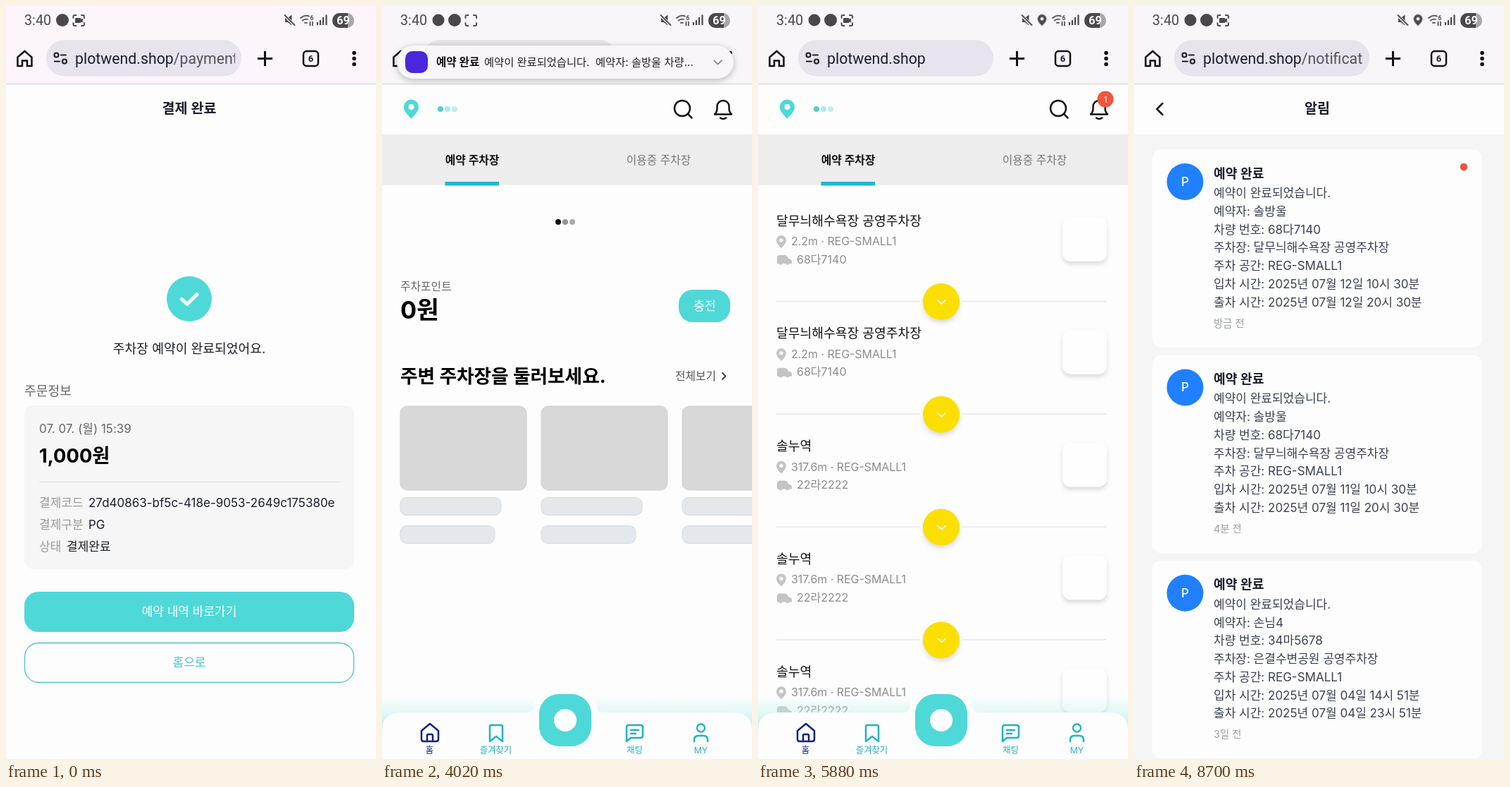
Recreate the animation shown at these times as an HTML page. Size 525 px wide and 1067 px high, loop 8.76 s.

```html
<!DOCTYPE html>
<html lang="ko">
<head>
<meta charset="utf-8">
<title>주차 예약</title>
<style>
html, body { margin: 0; width: 100%; height: 100%; overflow: hidden; background: #fdfdfd; }
svg { display: block; }
text { font-family: Inter, "Noto Sans CJK KR", sans-serif; font-size: 17px; fill: #1b1d2c; white-space: pre; }
.ui text { font-family: Roboto, sans-serif; }
.mid { text-anchor: middle; }
.line { fill: none; stroke: currentColor; stroke-width: 2.5; stroke-linecap: round; stroke-linejoin: round; }
.b { font-weight: 600; }
.bb { font-weight: 700; }
.grey { fill: #999; }
.s12 { font-size: 12.3px; }
.s14 { font-size: 14.4px; }
.s15 { font-size: 15.8px; }
.s18 { font-size: 18.2px; }
.s19 { font-size: 19.6px; }
.s21 { font-size: 21.3px; }
.s26 { font-size: 26.7px; }

/* scenes: hard cuts on one shared loop */
.cut { animation: 8.76s step-end infinite; }
.pay { animation-name: pay; }
.home { animation-name: home; }
.alerts { animation-name: alerts; }
.skeleton { animation-name: skeleton; }
.loaded { animation-name: loaded; }
.planet { animation-name: planet; }
.shift { animation-name: shift; }
.mute { animation-name: mute; }
.rec { animation-name: rec; }
@keyframes pay { 0% { opacity: 1 } 43.83%, 100% { opacity: 0 } }
@keyframes home { 0% { opacity: 0 } 43.83% { opacity: 1 } 69.17%, 100% { opacity: 0 } }
@keyframes alerts { 0% { opacity: 0 } 69.17%, 100% { opacity: 1 } }
@keyframes skeleton { 0% { opacity: 1 } 50%, 100% { opacity: 0 } }
@keyframes loaded { 0% { opacity: 0 } 50%, 100% { opacity: 1 } }
@keyframes planet { 0% { opacity: 0 } 15.74%, 100% { opacity: 1 } }
@keyframes shift { 0% { transform: none } 15.74%, 100% { transform: translateX(23px) } }
@keyframes mute { 0% { transform: none } 50%, 100% { transform: translateX(-21px) } }
@keyframes rec {
  0%, 8.21%, 19.17%, 29.44%, 41.09%, 51.36%, 62.32%, 73.28%, 83.55%, 94.51% { opacity: 1 }
  2.73%, 13.69%, 24.65%, 35.61%, 45.88%, 56.84%, 67.8%, 78.76%, 89.72% { opacity: 0 }
}

.bar { animation: bar 8.76s linear infinite; }
@keyframes bar { 0%, 19.17% { fill: #fcf5fc } 27.4%, 100% { fill: #f9f6fa } }

.toast { animation: toast 8.76s infinite; transform-origin: 260px 80px; filter: drop-shadow(0 2px 5px #0004); }
@keyframes toast {
  0%, 19.17% { transform: translateY(-115px) scale(.86); animation-timing-function: cubic-bezier(.2, .8, .2, 1) }
  27.4%, 54.1% { transform: none; animation-timing-function: cubic-bezier(.5, 0, .8, .5) }
  58.9%, 100% { transform: translateY(-115px) scale(.94) }
}

.dots circle { animation: .876s linear -.36s infinite; }
.dots circle:nth-child(1) { animation-name: dotA; }
.dots circle:nth-child(2) { animation-name: dotB; }
.dots circle:nth-child(3) { animation-name: dotC; }
@keyframes dotA { 0%, 12%, 100% { opacity: 1 } 44% { opacity: .9 } 65% { opacity: .4 } }
@keyframes dotB { 0%, 12%, 100% { opacity: .45 } 44% { opacity: .85 } 70% { opacity: .6 } }
@keyframes dotC { 0%, 12%, 100% { opacity: .35 } 44% { opacity: .25 } 78% { opacity: 1 } }

.ping { transform-origin: 493px 132px; animation: ping .97333s cubic-bezier(0, 0, .2, 1) -.7s infinite; }
@keyframes ping { 0% { opacity: .6 } 75%, 100% { transform: scale(2); opacity: 0 } }
.soft { filter: drop-shadow(0 4px 3px #0002); }
</style>
</head>
<body>
<svg width="525" height="1067" viewBox="0 0 525 1067">
  <defs>
    <linearGradient id="mist" x2="0" y2="1">
      <stop stop-color="#c4f3f1" stop-opacity="0"/>
      <stop offset="1" stop-color="#a9ecea"/>
    </linearGradient>
    <clipPath id="urlClip"><path d="M96 50H325V98H96Z"/></clipPath>
    <g id="pin">
      <path d="M0 14C-4 9-10.5 4-10.5-3a10.5 10.5 0 0 1 21 0C10.5 4 4 9 0 14Z"/>
      <circle cy="-3" r="4" fill="#fff"/>
    </g>
    <path id="car" d="M27 357q0-4 4-4h7q2 0 3.500 2l2 3q4.500 .5 4.500 4v3h-3q-3 3.500-6 0h-4q-3 3.500-6 0h-2Z"/>
  </defs>
  <rect width="525" height="1067" fill="#fdfdfd"/>

  <!-- payment -->
  <g class="cut pay">
    <text class="mid b s19" x="260" y="152">결제 완료</text>
    <circle cx="260" cy="415" r="32" fill="#4fd8d8"/>
    <path class="line" style="stroke-width:5" color="#fff" d="M249.500 415.500l7.500 7 14-14"/>
    <text class="mid s18" x="260" y="492">주차장 예약이 완료되었어요.</text>
    <text class="s18" x="26" y="552" style="fill:#666">주문정보</text>
    <rect x="26" y="566" width="468" height="232" rx="13" fill="#f6f6f6"/>
    <text x="47" y="605" style="fill:#666">07. 07. (월) 15:39</text>
    <text class="bb" x="47" y="647" style="font-size:27.300px;fill:#000">1,000원</text>
    <path d="M47 674.500H474" stroke="#dedede"/>
    <text class="grey" x="47" y="710">결제코드</text>
    <text x="117" y="710">27d40863-bf5c-418e-9053-2649c175380e</text>
    <text class="grey" x="47" y="741">결제구분</text>
    <text x="117" y="741">PG</text>
    <text class="grey" x="47" y="772">상태</text>
    <text x="86" y="772">결제완료</text>
    <rect x="26" y="830" width="468" height="57" rx="20" fill="#4fd8d8"/>
    <text class="mid" x="260" y="864" style="fill:#fff">예약 내역 바로가기</text>
    <rect x="26.500" y="902.500" width="467" height="56" rx="20" fill="none" stroke="#4bc3ca" stroke-width="1.300"/>
    <text class="mid" x="260" y="936" style="fill:#45c4ca">홈으로</text>
  </g>

  <!-- home -->
  <g class="cut home">
    <use href="#pin" x="41.500" y="146" fill="#4fd8d8"/>
    <g class="dots" fill="#4fd0d2">
      <circle cx="83" cy="146" r="4"/><circle cx="93" cy="146" r="4"/><circle cx="103" cy="146" r="4"/>
    </g>
    <g class="line" color="#111">
      <circle cx="426" cy="145" r="11"/><path d="M434.500 153.500l5 5"/>
      <path d="M472 153.500q3.500-3 3.500-9v-2a8.500 8.500 0 0 1 17 0v2q0 6 3.500 9ZM480 158.500q4 3 8 0"/>
    </g>
    <rect y="182" width="525" height="71.500" fill="#ededed"/>
    <text class="mid s15 b" x="128" y="224" style="fill:#111">예약 주차장</text>
    <text class="mid s15" x="392.500" y="224" style="fill:#777">이용중 주차장</text>
    <rect x="89.500" y="249" width="76.500" height="5.500" fill="#1fb9cd"/>

    <g class="cut skeleton">
      <g class="dots" fill="#111">
        <circle cx="250" cy="306" r="4"/><circle cx="260" cy="306" r="4"/><circle cx="270" cy="306" r="4"/>
      </g>
      <text class="s15" x="26" y="403" style="fill:#666">주차포인트</text>
      <text class="bb" x="26" y="443" style="font-size:34.300px;fill:#000">0원</text>
      <rect x="421" y="402" width="73" height="46" rx="20" fill="#4fd8d8"/>
      <text class="mid" x="458" y="431" style="fill:#fff">충전</text>
      <text class="bb s26" x="26" y="534" style="fill:#000">주변 주차장을 둘러보세요.</text>
      <text class="s15" x="416" y="530" style="fill:#555">전체보기</text>
      <path class="line" style="stroke-width:2" color="#444" d="M483 520l4.500 4.500-4.500 4.500"/>
      <g id="bones"></g>
    </g>
    <g class="cut loaded">
      <g id="rows"></g>
      <circle class="ping" cx="493" cy="132" r="11.500" fill="#f4755a"/>
      <circle cx="493" cy="132" r="11.500" fill="#f1553d"/>
      <text class="mid s12" x="493" y="136.500" style="fill:#fff">1</text>
    </g>

    <rect y="976" width="525" height="60" fill="url(#mist)"/>
    <path d="M0 1067V1027Q0 1001 28 1001H207Q215 1001 215 993Q216 966 246 966H274Q304 966 305 993Q305 1001 313 1001H497Q525 1001 525 1027V1067Z" fill="#fdfdfd"/>
    <rect x="223" y="975" width="74" height="74" rx="28" fill="#4fd8d8"/>
    <circle cx="260" cy="1012" r="16" fill="#fff"/>
    <g class="line">
      <path color="#15217d" d="M56 1027l12-10 12 10v12q0 3-3 3H59q-3 0-3-3ZM64 1042v-8q0-2 2-2h4q2 0 2 2v8"/>
      <g color="#20b3c4">
        <path d="M153 1021q0-2 2-2h14q2 0 2 2v21l-9-7-9 7Z"/>
        <path d="M347 1022q0-3 3-3h17q3 0 3 3v12q0 3-3 3H353l-6 5ZM353 1026h11M353 1031h7"/>
        <circle cx="452.500" cy="1023" r="5.500"/>
        <path d="M443 1042v-2q0-6 6-6h7q6 0 6 6v2"/>
      </g>
    </g>
    <g class="mid">
      <text class="s12" x="67.500" y="1059" style="fill:#15217d">홈</text>
      <text class="s12" x="161.500" y="1059" style="fill:#20b3c4">즐겨찾기</text>
      <text class="s12" x="358.500" y="1059" style="fill:#20b3c4">채팅</text>
      <text class="s12" x="452.500" y="1059" style="fill:#20b3c4">MY</text>
    </g>
  </g>

  <!-- alerts -->
  <g class="cut alerts">
    <rect y="182" width="525" height="885" fill="#f5f5f5"/>
    <path class="line" color="#111" d="M40.500 138l-8 8 8 8"/>
    <text class="mid b s19" x="260" y="152">알림</text>
    <g id="cards"></g>
    <circle cx="468" cy="228" r="5.300" fill="#f4533d"/>
  </g>

  <!-- browser bar -->
  <g class="ui">
    <rect class="bar" width="525" height="110"/>
    <path d="M0 110.500H525" stroke="#d9d6dc" stroke-width="1.300"/>
    <path class="line" style="stroke-linejoin:miter" color="#111" d="M16.500 72.500l10-8.500 10 8.500V85H30v-7.500h-7V85h-6.500Z"/>
    <rect x="57" y="48" width="277" height="51.500" rx="25.700" fill="#e7e4ed"/>
    <g class="line" style="stroke-width:2.200" color="#222">
      <circle cx="71.500" cy="69.500" r="3"/><path d="M78 69.500h7M69 78.500h7"/><circle cx="83" cy="78.500" r="3"/>
    </g>
    <g id="urls" clip-path="url(#urlClip)"></g>
    <path class="line" style="stroke-width:3;stroke-linecap:butt" color="#111" d="M357 74.500h21M367.500 64v21"/>
    <rect x="422" y="64" width="21" height="21" rx="4.500" class="line" color="#111"/>
    <text class="mid bb" x="432.500" y="79" style="font-size:13px">6</text>
    <g fill="#111"><circle cx="494" cy="66.500" r="2.800"/><circle cx="494" cy="74.500" r="2.800"/><circle cx="494" cy="82.500" r="2.800"/></g>
  </g>

  <!-- heads-up notification -->
  <g class="toast">
    <rect x="21" y="56" width="478" height="47" rx="23.500" fill="#f8f6f9"/>
    <rect x="33" y="64" width="32" height="31" rx="10" fill="#4a27dc"/>
    <text class="b" x="77" y="85" style="font-size:15.600px;fill:#111">예약 완료</text>
    <text x="145" y="85" style="font-size:15.300px;fill:#222">예약이 완료되었습니다.  예약자: 솔방울 차량...</text>
    <path class="line" style="stroke-width:1.600" color="#777" d="M471 77l5.500 5.500 5.500-5.500"/>
  </g>

  <!-- status bar -->
  <g class="ui" fill="#4a484d" color="#4a484d">
    <text x="26" y="27" style="font-size:19.800px;fill:#4a484d">3:40</text>
    <circle class="cut planet" cx="80" cy="20" r="8.500"/>
    <g class="cut shift">
      <circle cx="80" cy="20" r="9"/>
      <path class="line" style="stroke-width:1.900" d="M95.500 17v-2q0-2 2-2h2M107 13h2q2 0 2 2v2M111 24v2q0 2-2 2h-2M99.500 28h-2q-2 0-2-2v-2"/>
      <path class="cut rec" d="M99 17h6q1.500 0 1.500 1.500l2.500-1v6l-2.500-1q0 1.500-1.500 1.500h-6q-1 0-1-1v-5q0-1 1-1Z"/>
    </g>
    <g class="cut mute">
      <path d="M396 17h3.500l6-4.500v15l-6-4.500H396Z"/>
      <path class="bar-gap" d="M394 12l16 16" stroke="#fbf6fb" stroke-width="4"/>
      <path class="line" style="stroke-width:1.800" d="M395.500 13l14 14"/>
    </g>
    <g class="cut loaded"><use href="#pin" transform="translate(403 20) scale(.6)"/></g>
    <path class="line" style="stroke-width:1.700" d="M418 17q6-5 12-2.500M421 20.500q4-3 7-1.500M424 24q1.500-1 3 0M431.500 27.500v-5M435 22.500v5"/>
    <text x="431.500" y="19.500" class="bb" style="font-size:8.500px;fill:#4a484d">6</text>
    <path d="M442 27v-4M446 27v-7M450 27V16M454.500 27V12.500" stroke="currentColor" stroke-width="2.200"/>
    <rect x="463" y="10" width="31" height="21" rx="10.500" fill="#a9a7ac"/>
    <path d="M473.500 10H485V31H473.500a10.500 10.500 0 0 1 0-21Z"/>
    <text class="mid bb" x="478.500" y="26" style="font-size:16px;fill:#fff">69</text>
  </g>
</svg>

<script>
const fill = (id, items, draw) => {
  document.getElementById(id).innerHTML = items.map(draw).join('');
};

const urls = [['pay', '/payment'], ['home', ''], ['alerts', '/notificat']];
fill('urls', urls, ([scene, tail]) => `
  <text class="cut ${scene} s21" x="98" y="82">plotwend.shop<tspan fill="#55535c">${tail}</tspan></text>`);

fill('bones', [26, 226, 426], x => `
  <rect x="${x}" y="567" width="179" height="119" rx="10" fill="#d8d8d8" stroke="#cfd0d3"/>
  <g fill="#e4e7eb" stroke="#d5d9df">
    <rect x="${x}" y="696.5" width="143" height="25" rx="9"/>
    <rect x="${x}" y="736.5" width="134" height="25" rx="9"/>
  </g>`);

const beach = ['달무늬해수욕장 공영주차장', '2.2m', '68다7140'];
const station = ['솔누역', '317.6m', '22라2222'];
fill('rows', [beach, beach, station, station, station], ([name, far, plate], i) => `
  <g transform="translate(0 ${i * 159.8})">
    <text class="s18" x="26" y="310.5" style="fill:#111">${name}</text>
    <use href="#pin" transform="translate(33 334) scale(.66)" fill="#c4c4c4"/>
    <text x="47" y="339" style="font-size:15.9px;fill:#8c8c8c">${far} · REG-SMALL1</text>
    <use href="#car" fill="#c4c4c4"/>
    <text x="55" y="364.5" style="font-size:16px;fill:#8c8c8c">${plate}</text>
    <rect class="soft" x="432" y="299" width="63" height="63" rx="12" fill="#fefefe"/>
    <path d="M26 418.5H230M290 418.5H494" stroke="#e5e4ec" stroke-width="1.4"/>
    <circle class="soft" cx="260" cy="419" r="26" fill="#fadf00"/>
    <path class="line" style="stroke-width:1.7" color="#fff" d="M255 417l5.5 5 5.5-5"/>
  </g>`);

const visit = (day, from, to) => [
  `입차 시간: 2025년 07월 ${day}일 ${from}분`,
  `출차 시간: 2025년 07월 ${day}일 ${to}분`,
];
const alerts = [
  ['솔방울', beach[2], beach[0], visit('12', '10시 30', '20시 30'), '방금 전'],
  ['솔방울', beach[2], beach[0], visit('11', '10시 30', '20시 30'), '4분 전'],
  ['손님4', '34마5678', '은결수변공원 공영주차장', visit('04', '14시 51', '23시 51'), '3일 전'],
];
fill('cards', alerts, ([who, plate, lot, times, ago], i) => {
  const lines = ['예약이 완료되었습니다.', `예약자: ${who}`, `차량 번호: ${plate}`,
    `주차장: ${lot}`, '주차 공간: REG-SMALL1', ...times];
  return `<g transform="translate(0 ${i * 291.4})">
    <rect x="26" y="203" width="468" height="281" rx="13" fill="#fdfdfd"/>
    <circle cx="72.5" cy="249" r="26" fill="#2080ff"/>
    <text class="mid" x="72.5" y="255" style="fill:#fff;font-weight:500">P</text>
    <text class="b s18" x="113" y="243.5">예약 완료</text>
    ${lines.map((s, n) => `<text x="113" y="${271 + n * 25.75}" style="fill:#3a4150">${s}</text>`).join('')}
    <text class="s14" x="113" y="454.5" style="fill:#9a9ea8">${ago}</text>
  </g>`;
});
</script>
</body>
</html>
```
